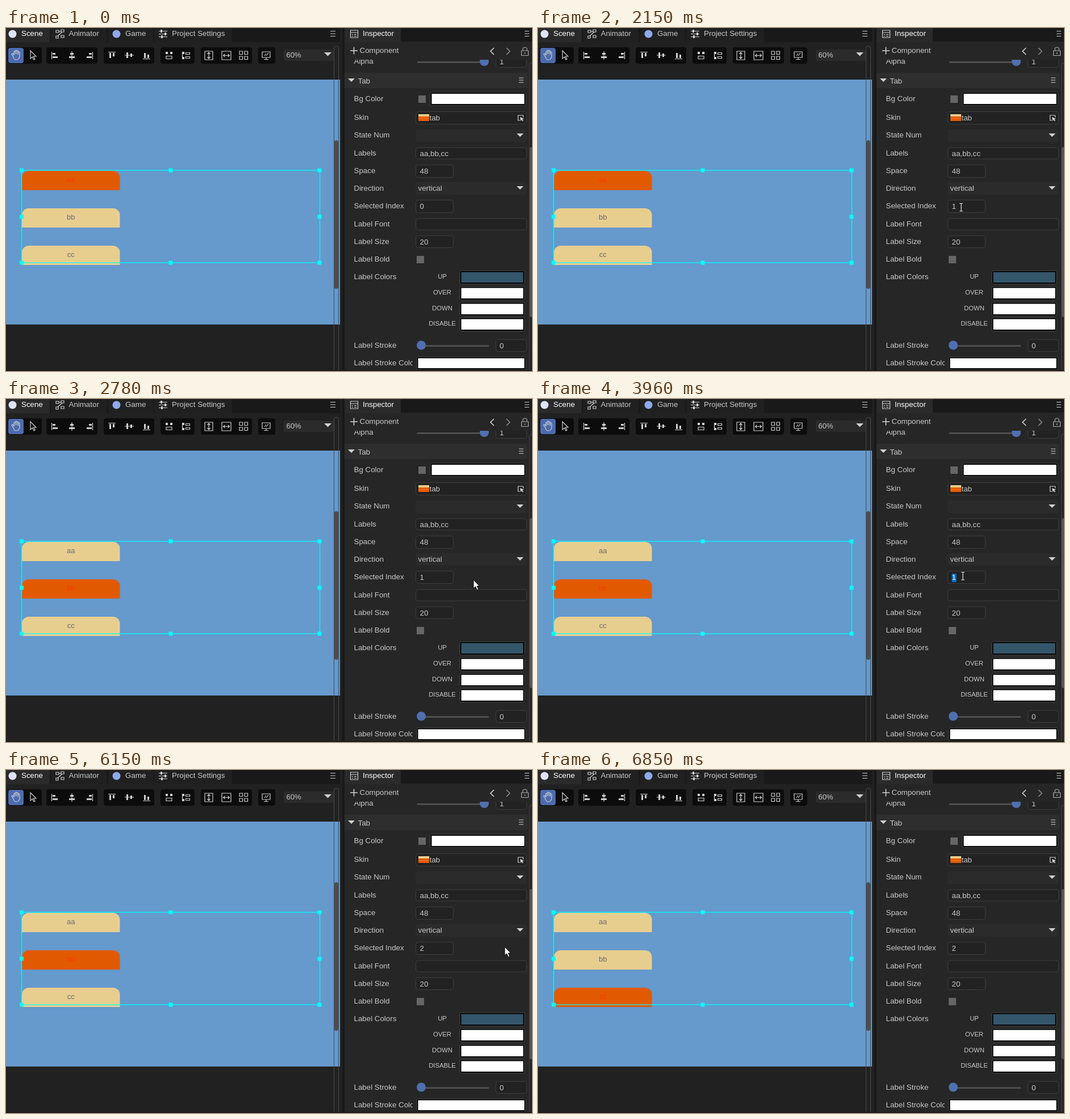
Write an HTML page that moves like this. It is 926 px wide and 605 px high and loops after 7.62 s.

```html
<!DOCTYPE html>
<html lang="en">
<head>
<meta charset="utf-8">
<title>Tab inspector</title>
<style>
  html, body { margin: 0; width: 100%; height: 100%; overflow: hidden; background: #212121; }
  svg { display: block; width: 926px; height: 605px; }
  text { font: 13.33px "Liberation Sans", Arial, sans-serif; fill: #c8c8c8; white-space: pre; }
  .bright { fill: #fff; }
  .small { font-size: 11.3px; }
  .tab text { font-size: 13px; text-anchor: middle; fill: #686a70; }
  .tab path { fill: #e8ce8e; }
  .tab.on path { fill: #e25a00; }
  .tab.on text { fill: #ff3a08; }
  .icon { fill: none; stroke: #d0d0d0; stroke-width: 1.2; }
  .solid { fill: #d0d0d0; }
</style>
</head>
<body>
<svg id="stage" viewBox="0 0 926 605"></svg>
<script>
const LOOP = 7620, STEP = 77;

// Markup helpers
const rect = (x, y, w, h, fill, more = '') =>
  `<rect x="${x}" y="${y}" width="${w}" height="${h}" fill="${fill}" ${more}/>`;
const text = (x, y, s, more = '') => `<text x="${x}" y="${y}" ${more}>${s}</text>`;
const icon = (d, more = '') => `<path class="icon" d="${d}" ${more}/>`;
const solid = (d, more = '') => `<path class="solid" d="${d}" ${more}/>`;
const disc = (x, y, r, fill) => `<circle cx="${x}" cy="${y}" r="${r}" fill="${fill}"/>`;
const label = (center, s) => text(612.5, Math.round(center + 4), s);
const field = (x, y, w, h) =>
  rect(x + .5, y + .5, w - 1, h - 1, '#222', 'rx="4" stroke="#3e3e3e"');
const input = (y, h, value, w = 67) =>
  field(721, y, w, h) + text(728.5, Math.floor(y + 16), value);
const dropdown = (y, value) =>
  rect(721, y, 196, 22, '#2b2b2b', 'rx="4"') + text(725.5, y + 15, value) +
  solid(`M899 ${y + 7}h12l-6 6z`);
const swatch = (x, y, w, h, fill) =>
  field(x - 3, y - 3, w + 6, h + 6) + rect(x - 1, y - 1, w + 2, h + 2, '#000') +
  rect(x + .5, y + .5, w - 1, h - 1, fill);
const checkbox = (x, y) => rect(x, y, 13, 13, '#666');
const menu = (x, y, w, gap) => icon([0, 1, 2].map(i => `M${x} ${y + i * gap}h${w}`).join(''));

function sceneHeader() {
  const groups = [[3, 60], [71, 90], [172, 89], [272, 60], [343, 90], [444, 30]];
  return rect(0, 0, 588, 25, '#191919') + rect(0, 0, 77, 25, '#2a2a2a') +
    [[79, 98], [180, 79], [261, 137]].map(([x, w]) => rect(x, 0, w, 25, '#202020')).join('') +
    disc(11.5, 10.5, 7, '#dfe3fa') + text(27, 14, 'Scene', 'class="bright"') +
    icon('M88 4h5v4h-5zM97 3h5v4h-5zM88 14h4v4h-4zM97 13h5v4h-5zM93 6h4M99 7l-8 7') +
    text(110.5, 14, 'Animator') +
    disc(194.5, 10.5, 7, '#8fa9ea') + text(210, 14, 'Game') +
    icon('M269 5.5h15M269 10.5h15M269 15.5h15') +
    solid('M272 3h3v5h-3zM279 8h3v5h-3zM273 13h3v5h-3z') +
    text(292, 14, 'Project Settings') + menu(571, 5.5, 9, 4.5) +
    groups.map(([x, w]) => rect(x, 34, w, 29, '#0c0c0c', 'rx="4"')).join('') +
    rect(4, 35, 27, 27, '#4c6cb0', 'rx="4"') + toolbarIcons() +
    rect(489, 38, 88, 20, '#2b2b2b', 'rx="3"') +
    text(493.5, 52, '60%', 'style="font-size:13px"') + solid('M560 43h13l-6.500 6.500z');
}

function toolbarIcons() {
  return icon('M13 51l-3-5q1-2 3 0l1 2v-6q1.500-2 2.500 0v4v-6q1.500-2 2.500 0v6v-5q1.500-2 2.500 0v6v-4q1.500-2 2.500 0v7q-1 6-6 6q-4 0-5-5z') +
    icon('M43 40v14l3.500-3l2.500 5l2-1l-2.500-5h4.500z') +
    icon('M80.500 42v13M116 41v15M152.500 42v13M180 42.500h13M209 48h16M241 54.500h13') +
    solid('M82 44h5v3h-5zM82 50h9v3h-9zM113 44h6v3h-6zM111 50h10v3h-10zM146 44h5v3h-5zM142 50h9v3h-9z') +
    solid('M182 44h3v9h-3zM188 44h3v6h-3zM212 43h3v10h-3zM219 45h3v6h-3zM243 44h3v9h-3zM249 47h3v6h-3z') +
    icon('M282 49.500h10v5h-10zM310.500 42v13M316.500 43.500h7v3h-7zM316.500 50.500h7v3h-7z') +
    solid('M281 42h4v4h-4zM289 42h4v4h-4zM310 42h4v4h-4zM310 51h4v4h-4z') +
    icon('M350 41h14v15h-14zM357 43.500v10M354.500 46l2.500-3l2.500 3M354.500 51l2.500 3l2.500-3') +
    icon('M380 41h16v15h-16zM382.500 48.500h11M385.500 46l-3 2.500l3 2.500M390.500 46l3 2.500l-3 2.500') +
    icon('M411 41h5.500v5.500h-5.500zM420 41h5.500v5.500h-5.500zM411 50h5.500v5.500h-5.500zM420 50h5.500v5.500h-5.500z') +
    icon('M451 42h14v10h-14zM458 52v3.500M454 55.500h8M455 49l3-4M458 49l4-5');
}

function viewport() {
  const tabs = ['aa', 'bb', 'cc'].map((name, i) => {
    const y = 252 + 66 * i;
    return `<g class="tab"><path d="M28 ${y + 34}v-22a12 12 0 0 1 12-12h148.500a12 12 0 0 1 12 12v22z"/>` +
      text(114.3, y + 20, name) + '</g>';
  });
  const handles = [27.5, 290, 552].flatMap(x => [251, 333, 414].map(y =>
    x === 290 && y === 333 ? '' : rect(x - 3.5, y - 3.5, 7, 7, '#0ff')));
  return rect(0, 91, 588, 432, '#69c') + tabs.join('') +
    rect(27.5, 251, 525, 163, 'none', 'stroke="#0ff" stroke-width="1.3"') + handles.join('') +
    '<path d="M577.500 605v-569q0-4 4-4t4 4v569" fill="none" stroke="#4a4a4a"/>' +
    rect(578, 198, 7, 262, '#4d4d4d', 'rx="3.5"');
}

function inspector() {
  const states = ['UP', 'OVER', 'DOWN', 'DISABLE'];
  return rect(588, 0, 8, 605, '#212121') + rect(592, 0, 4, 605, '#191919') +
    rect(596, 0, 330, 605, '#262626') +
    // Scrolled content
    label(59, 'Alpha') + rect(724, 59, 114, 2.5, '#555') + disc(842, 59, 8, '#4f6fb0') +
    field(862, 48, 55, 22) + text(869, 64, '1') +
    rect(596, 79, 322, 27, '#2e2e2e') + solid('M602 89h12l-6 6z') +
    text(619.5, 98, 'Tab') + menu(903, 88, 8, 4) +
    label(125, 'Bg Color') + checkbox(726, 119) + swatch(749, 115.5, 164, 19, '#fff') +
    label(158, 'Skin') + field(721, 147, 196, 23) +
    rect(726, 152, 19, 12, '#e65a00') + rect(726, 152, 19, 4, '#e8ce8e') +
    rect(726, 159, 19, 1, '#f07a20') + text(745.5, 163, 'tab') +
    icon('M905 163h-3.500v-9h9v3.500') + solid('M905 157l7 3l-3 1l2 2.500l-1.500 1l-1.700-2.500l-1.800 2z') +
    label(189, 'State Num') + dropdown(179, '') +
    label(220.5, 'Labels') + input(210.5, 21, 'aa,bb,cc', 196) +
    label(252, 'Space') + input(241, 23, '48') +
    label(283, 'Direction') + dropdown(272, 'vertical') +
    label(314, 'Selected Index') + field(721, 303, 67, 23) +
    rect(728.5, 308, 8, 15, '#0c6fd0', 'id="highlight"') +
    text(728.5, 319, '0', 'id="index"') + rect(736, 308, 1, 15, '#e0e0e0', 'id="caret"') +
    label(345.5, 'Label Font') + input(335.5, 21, '', 196) +
    label(377, 'Label Size') + input(366, 22, '20') +
    label(408, 'Label Bold') + checkbox(723, 402) + label(439, 'Label Colors') +
    states.map((s, i) => text(768, Math.round(442 + 27.8 * i), s, 'class="small" text-anchor="middle"') +
      swatch(801, Math.round(430 + 27.8 * i), 110, 19.5, i ? '#fff' : '#34566b')).join('') +
    label(560, 'Label Stroke') + rect(737, 559.5, 113, 2.5, '#555') + disc(731, 559.5, 8, '#4f6fb0') +
    field(862, 549, 55, 22) + text(869, 565, '0') +
    label(591, 'Label Stroke Color') + rect(716, 578, 8, 27, '#262626') +
    swatch(725, 582, 188, 18.5, '#fff') +
    // Fixed header and scrollbar
    rect(596, 0, 330, 56, '#262626') + rect(596, 0, 330, 24, '#191919') +
    rect(596, 0, 99, 25, '#2a2a2a') +
    icon('M606.500 4h13v13h-13zM606.500 8h13M609 11.500h2M613 11.500h4M609 14.500h2M613 14.500h4') +
    text(628, 14, 'Inspector', 'class="bright"') + menu(913, 5.5, 8, 4.5) +
    icon('M606 40h13M612.500 33.500v13', 'style="stroke-width:1.6"') + text(622.5, 44, 'Component') +
    icon('M859 35l-6 6l6 6', 'style="stroke-width:1.6"') +
    icon('M881 35l6 6l-6 6', 'style="stroke:#888;stroke-width:1.6"') +
    icon('M907.500 40h12v8.500h-12zM910 40v-3q0-3 3.500-3t3.500 3v3M913.500 43v3', 'style="stroke:#aaa"') +
    '<path d="M921.500 605v-540q0-3 4-3" fill="none" stroke="#444"/>' +
    rect(922, 210, 6, 300, '#555', 'rx="3"') + rect(0, 603, 926, 2, '#1d191d');
}

const pointers =
  '<path id="arrow" d="M0 0v15l3.500-3.200l2.700 6l2.500-1.100l-2.600-5.700h4.400z" fill="#fff" stroke="#000" stroke-width=".9"/>' +
  '<path id="beam" d="M-3-6.500h2q1 0 1 1q0-1 1-1h2M0-6v13M-3 7h2q1 0 1-1q0 1 1 1h2" fill="none" stroke="#e8e8e8" stroke-width="1.2"/>';

const stage = document.getElementById('stage');
stage.innerHTML = rect(0, 0, 926, 605, '#212121') + sceneHeader() + viewport() + inspector() + pointers;

const [highlight, indexText, caret, arrow, beam] =
  ['highlight', 'index', 'caret', 'arrow', 'beam'].map(id => document.getElementById(id));
const tabs = [...stage.querySelectorAll('.tab')];

// Pointer moves advance in even steps along a polyline, then rest.
const moves = [
  { at: 0, steps: 1, path: [[-50, -50]] },
  { at: 70, steps: 9, path: [[815, 471], [775, 365], [738, 320], [749, 317]] },
  { at: 830, steps: 1, path: [[745, 316]] },
  { at: 2380, steps: 6, path: [[752, 316], [823, 319]] },
  { at: 3250, steps: 6, path: [[805, 319], [741, 315], [752, 315]] },
  { at: 3960, steps: 1, path: [[748, 312]] },
  { at: 5660, steps: 3, path: [[775, 312], [878, 312]] },
  { at: 6620, steps: 3, path: [[876, 345], [863, 590]] },
  { at: 6850, steps: 1, path: [[-50, -50]] }
];

function pointerAt(t) {
  const { at, steps, path } = moves.findLast(m => t >= m.at);
  const step = Math.min(steps - 1, Math.floor((t - at) / STEP));
  const place = steps > 1 ? step / (steps - 1) * (path.length - 1) : 0;
  const i = Math.floor(place), from = path[i], to = path[i + 1] || from;
  return from.map((v, k) => Math.round(v + (to[k] - v) * (place - i)));
}

const during = (t, ...spans) => spans.some(([a, b]) => t >= a && t < b);
const show = (node, on) => node.setAttribute('visibility', on ? 'visible' : 'hidden');

function draw(t) {
  const selecting = during(t, [830, 1620], [3960, 4890]);
  const selected = (t >= 2780) + (t >= 6230);
  tabs.forEach((tab, i) => tab.classList.toggle('on', i === selected));
  indexText.textContent = (t >= 1620) + (t >= 4890);
  indexText.classList.toggle('bright', selecting);
  show(highlight, selecting);
  show(caret, during(t, [1620, 2150], [4890, 5430], [5970, 6150]));

  const [x, y] = pointerAt(t);
  const overField = x > 721 && x < 788 && y > 303 && y < 326;
  show(arrow, !overField);
  show(beam, overField);
  (overField ? beam : arrow).setAttribute('transform', `translate(${x} ${y})`);
}

function tick() {
  draw(performance.now() % LOOP);
  requestAnimationFrame(tick);
}
tick();
</script>
</body>
</html>
```
